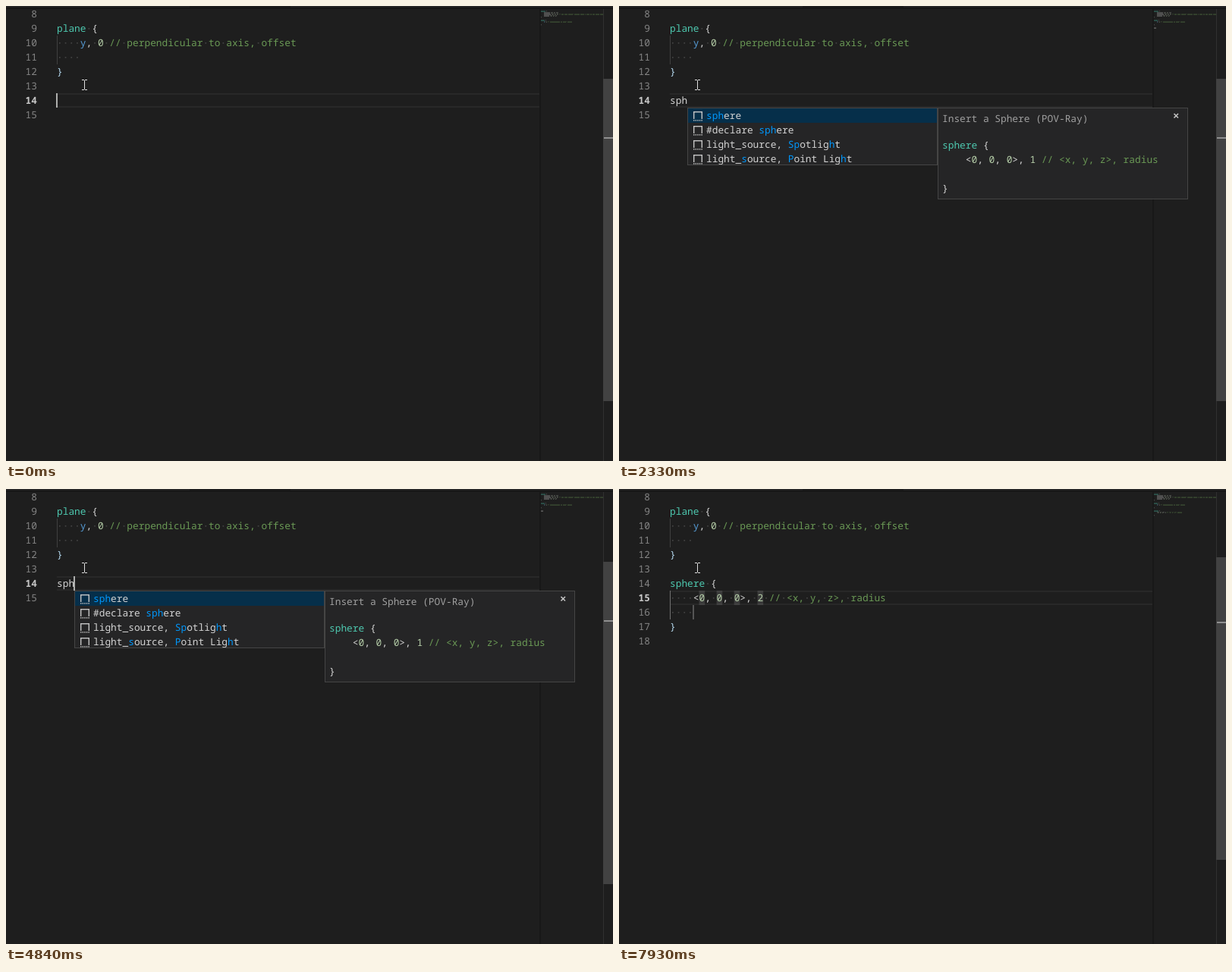
An HTML page with a canvas that plays this animation: 800x600 px, repeating every 8 s.

```html
<!DOCTYPE html>
<html lang="en">
<head>
<meta charset="utf-8">
<title>Snippet completion</title>
<style>
html, body { margin: 0; width: 100%; height: 100%; overflow: hidden; background: #1e1e1e; }
canvas { display: block; }
</style>
</head>
<body>
<canvas id="stage" width="800" height="600"></canvas>
<script>
const ctx = document.getElementById('stage').getContext('2d');
const LOOP = 8000, CH = 7.697, ROW = 19, LEFT = 67;
const FONT = '12.83px "Noto Sans Mono", "DejaVu Sans Mono", monospace';
const C = {
  text: '#d4d4d4', type: '#4ec9b0', key: '#569cd6', num: '#b5cea8',
  comment: '#6a9955', close: '#b4d8ee', match: '#0097fb'
};

// Each step changes part of the state from its time on.
const steps = [
  [0, { typed: 0, pick: 0, stop: -1, caret: true }],
  [280, { typed: 1 }], [530, { typed: 2 }], [810, { typed: 3 }],
  [1370, { caret: false }], [1800, { caret: true }], [2330, { caret: false }],
  [2450, { pick: 1 }], [2760, { caret: true }], [3290, { caret: false }],
  [3850, { caret: true }], [4000, { pick: 0 }], [4250, { caret: false }],
  [4840, { caret: true }],
  [5270, { stop: 0 }], [5670, { caret: false }], [6210, { caret: true }],
  [6480, { stop: 1 }], [6750, { stop: 2 }], [7130, { stop: 3 }],
  [7400, { stop: 4 }], [7930, { caret: false }]
];

const head = [
  '#include "colors.inc"', '', 'camera {', '    location <0, 1, -5>',
  '    direction <0, 0, 1> // the view vector, usually along z axis of the whole scene',
  '    look_at <0, 0, 0>', '}', '',
  'plane {', '    y, 0 // perpendicular to axis, offset', '    ', '}', ''
];
const items = [
  'sphere', '#declare sphere', 'light_source, Spotlight', 'light_source, Point Light',
  'superellipsoid', '#declare superellipsoid', 'light_source, Parallel',
  'light_source, Area', '#version', 'torus', '#declare torus'
];
const shown = [0, 11, 7, 4];
const body = ['    <0, 0, 0>, 1 // <x, y, z>, radius', '', '}'];
const details = [
  ['Insert a Sphere (POV-Ray)', '', 'sphere {', ...body],
  ['Declare a Sphere object (POV-Ray)', '', '#declare MySphere = sphere {', ...body,
    'object {', '    MySphere', '}']
];
const stops = [5, 8, 11, 15];

const colX = c => LEFT + c * CH;
const rowY = n => 115 + (n - 14) * ROW;

function rect(x, y, w, h, color) {
  ctx.fillStyle = color;
  ctx.fillRect(x, y, w, h);
}

function frame(x, y, w, h) {
  rect(x, y, w, h, '#454545');
  rect(x + 1, y + 1, w - 2, h - 2, '#252526');
}

function write(str, x, y, color) {
  ctx.fillStyle = color;
  [...str].forEach((ch, i) => {
    if (ch !== ' ') ctx.fillText(ch, x + i * CH, y);
  });
}

function tokenColor(tok) {
  if (tok.startsWith('//')) return C.comment;
  if (/^(plane|sphere|camera)$/.test(tok)) return C.type;
  if (/^(y|object|#.*)$/.test(tok)) return C.key;
  return /^\d/.test(tok) ? C.num : C.text;
}

function tokens(line) {
  return [...line.matchAll(/\/\/.*|#?\w+|[^\w\s]/g)];
}

function code(line, x, y) {
  for (const m of tokens(line)) write(m[0], x + m.index * CH, y, tokenColor(m[0]));
}

function dots(line, y) {
  [...line].forEach((ch, i) => {
    if (ch === ' ') rect(colX(i) + 3, y + 9, 1.7, 1.7, '#424242');
  });
}

function chrome() {
  rect(0, 0, 800, 600, '#1e1e1e');
  rect(703, 0, 2, 600, '#181818');
}

function topEdge() {
  rect(0, 0, 800, 2, '#262627');
  rect(242, 0, 133, 2, '#1e1e1e');
  rect(0, 2, 800, 1, '#121212');
  rect(0, 3, 800, 1, '#1a1a1a');
}

function minimap(lines) {
  ctx.globalAlpha = 0.45;
  lines.forEach((line, n) => {
    for (const m of tokens(line)) {
      const color = tokenColor(m[0]);
      [...m[0]].forEach((ch, i) => {
        if (ch === ' ') return;
        const small = /[^\w#]/.test(ch);
        rect(705 + m.index + i, 2.5 + n * 2, 1, small ? 0.7 : 1.2, color);
      });
    }
  });
  ctx.globalAlpha = 1;
}

function scrollbar(s) {
  const done = s.stop >= 0;
  rect(787, 3, 1, 597, '#303030');
  if (done) rect(787, 90, 13, 399, '#424242');
  else rect(787, 96, 13, 425, '#424242');
  const marks = s.stop < 0 || s.stop > 3 ? [] : s.stop === 3 ? [39] : [39, 64, 113, 176];
  for (const y of marks) rect(792, y, 5, 12, '#8c8c8c');
  rect(788, done ? 175 : 173, 12, 2, '#8f8f8f');
}

function lineHighlight(n) {
  const y = rowY(n);
  rect(LEFT, y, 636, 2, '#282828');
  rect(LEFT, y + 17, 636, 2, '#282828');
}

function boxes(s) {
  const y = rowY(15), soft = 'rgba(173,214,255,0.15)';
  if (s.stop < 3) rect(colX(7), rowY(10), CH, ROW, soft);
  stops.forEach((c, i) => {
    if (i === s.stop) rect(colX(c), y, CH, ROW, '#264f78');
    else if (s.stop < 3 && i < 3) rect(colX(c), y, CH, ROW, soft);
    rect(colX(c), y, CH, ROW, 'rgba(124,124,124,0.3)');
  });
  rect(97, rowY(16), 2, ROW, '#555555');
}

function editor(s, lines) {
  const done = s.stop >= 0, current = done ? 15 : 14;
  if (!done || s.stop === 4) lineHighlight(current);
  if (done) boxes(s);
  rect(LEFT, rowY(10), 1, ROW * 2, '#404040');
  if (done) rect(LEFT, rowY(15), 1, ROW * 2, '#707070');

  for (let n = 8; n <= lines.length; n++) {
    const y = rowY(n), line = lines[n - 1], label = String(n);
    ctx.font = (n === current ? 'bold ' : '') + FONT;
    write(label, 41 - label.length * CH, y + 14, n === current ? '#c6c6c6' : '#858585');
    ctx.font = FONT;
    dots(line, y);
    if (line === '}') write(line, LEFT, y + 14, C.close);
    else code(line, LEFT, y + 14);
  }

  if (s.caret) {
    const col = !done ? s.typed : s.stop === 4 ? 16 : stops[s.stop] + 1;
    rect(Math.floor(66.7 + col * CH), rowY(current), 2, ROW, '#aeafad');
  }
}

// Longest joined start of the query first, then the other letters in order.
function matches(label, query) {
  const low = label.toLowerCase();
  let n = query.length;
  while (n > 1 && !low.includes(query.slice(0, n))) n--;
  let at = low.lastIndexOf(query.slice(0, n));
  const hits = new Set();
  for (let i = 0; i < query.length; i++) {
    at = low.indexOf(query[i], at);
    hits.add(at++);
  }
  return hits;
}

function icon(x, y) {
  rect(x, y, 12, 1.4, '#c5c5c5');
  rect(x, y, 1.4, 10, '#c5c5c5');
  rect(x + 10.6, y, 1.4, 10, '#c5c5c5');
  for (let i = 0; i < 12; i += 2.6) rect(x + i, y + 11.2, 1.5, 1.4, '#c5c5c5');
}

function popup(s) {
  const x = Math.round(66.9 + s.typed * CH), top = 134;
  const count = shown[s.typed], h = count * ROW;
  const query = 'sph'.slice(0, s.typed);
  frame(x, top, 330, h);
  ctx.save();
  ctx.beginPath();
  ctx.rect(x + 1, top + 1, 328, h - 2);
  ctx.clip();
  items.slice(0, count).forEach((label, i) => {
    const y = top + 1 + i * ROW, hits = matches(label, query);
    if (i === s.pick) rect(x + 1, y, 328, ROW, '#062f4a');
    icon(x + 8, y + 4);
    [...label].forEach((ch, k) =>
      write(ch, x + 25 + k * CH, y + 14, hits.has(k) ? C.match : C.text));
  });
  ctx.restore();

  const lines = details[s.pick], dx = x + 330;
  frame(dx, top, 330, s.pick ? 178 : 121);
  lines.forEach((line, i) => {
    const y = 153 + i * ROW - (i ? 3 : 0);
    if (i) code(line, dx + 6, y);
    else write(line, dx + 6, y, '#a0a0a0');
  });
  ctx.strokeStyle = '#c5c5c5';
  ctx.lineWidth = 1.6;
  ctx.beginPath();
  ctx.moveTo(dx + 311.5, 142); ctx.lineTo(dx + 317, 147.5);
  ctx.moveTo(dx + 317, 142); ctx.lineTo(dx + 311.5, 147.5);
  ctx.stroke();
}

function pointer() {
  const c = '#e0e0e0';
  rect(103, 98, 1, 12, c);
  for (const y of [97, 110]) {
    rect(100, y, 3, 1, c);
    rect(104, y, 3, 1, c);
  }
}

function draw(t) {
  const s = {};
  for (const [at, change] of steps) if (t >= at) Object.assign(s, change);
  const tail = s.stop < 0
    ? ['sph'.slice(0, s.typed), '']
    : ['sphere {', s.stop === 4 ? body[0].replace('1', '2') : body[0], '    ', '}', ''];
  const lines = head.concat(tail);

  ctx.font = FONT;
  ctx.textRendering = 'geometricPrecision';
  chrome();
  editor(s, lines);
  minimap(lines);
  scrollbar(s);
  topEdge();
  pointer();
  if (s.stop < 0 && s.typed) popup(s);
}

const start = performance.now();
function tick() {
  draw((performance.now() - start) % LOOP);
  requestAnimationFrame(tick);
}
tick();
</script>
</body>
</html>
```
